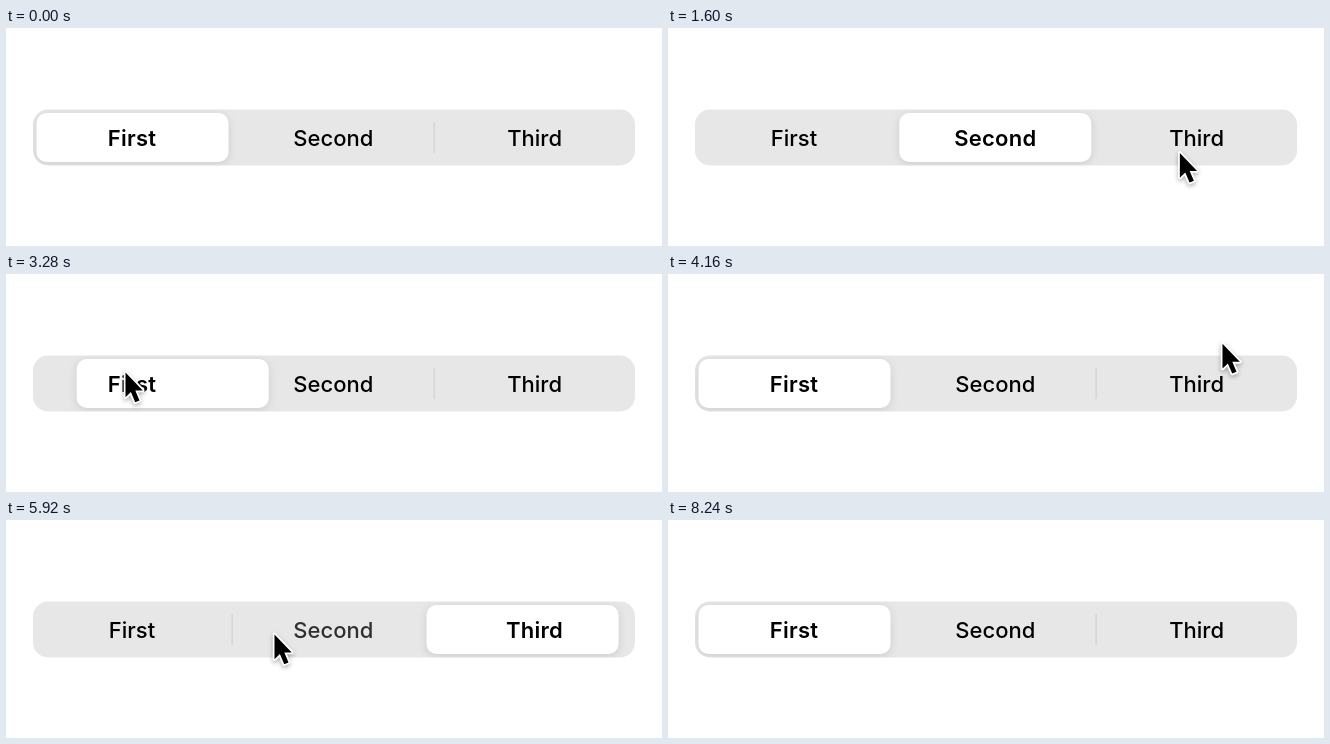
An HTML page for the animation above (9520 ms loop, 656 px wide and 218 px high).

```html
<!DOCTYPE html>
<html lang="en">
<head>
<meta charset="utf-8">
<title>Segmented control</title>
<style>
  html, body { margin: 0; width: 100%; height: 100%; overflow: hidden; background: #fff; }
  svg { display: block; width: 656px; height: 218px; }
  text { font: 500 22px Inter, "Liberation Sans", sans-serif; text-anchor: middle; }
  .bold { font-weight: 600; letter-spacing: .25px; }
  .track { fill: #e7e7e7; }
  .divider { fill: #d2d2d2; }
  #thumb { fill: #fff; filter: drop-shadow(0 2px 4px rgba(0, 0, 0, .11)); }
  #cursor { filter: drop-shadow(0 2px 2px rgba(0, 0, 0, .3)); }
  #cursor path { stroke: #fff; stroke-width: 4; paint-order: stroke; stroke-linejoin: round; }
</style>
</head>
<body>
<svg viewBox="0 0 656 218">
  <clipPath id="inside"><rect x="27" y="81.5" width="602" height="56" rx="15"/></clipPath>
  <rect class="track" x="27" y="81.5" width="602" height="56" rx="15"/>
  <rect class="divider" x="225.5" y="94" width="1.3" height="31"/>
  <rect class="divider" x="427.5" y="94" width="1.3" height="31"/>
  <g clip-path="url(#inside)">
    <rect id="thumb" y="85" width="192" height="49" rx="10"/>
  </g>
  <g id="labels"></g>
  <g id="cursor">
    <path transform="translate(1.5 1.5) scale(.9)" d="M0 0V27.5L6 21.8L10.8 33L15.6 31L10.9 20H19.2Z"/>
  </g>
</svg>
<script>
const LOOP = 9520, STEP = 80, SPRING = 0.024;
const SHOWN = 160, HIDDEN = 8240;
const thumbX = i => 30.5 + 200.8 * i;
const labelX = i => 126 + 201.3 * i;

// The pointer glides to x, y from start until tap, then presses segment seg
const glides = [
  { start: 80, tap: 807, seg: 1, x: 319, y: 115, bow: 0 },
  { start: 1120, tap: 2020, seg: 2, x: 532, y: 100, bow: 22 },
  { start: 2400, tap: 3118, seg: 0, x: 118, y: 97, bow: -34 },
  { start: 3680, tap: 4340, seg: 2, x: 562, y: 94, bow: -34 },
  { start: 4880, tap: 5904, seg: 1, x: 267, y: 113, bow: 0 },
  { start: 6400, tap: 7095, seg: 0, x: 161, y: 113, bow: 0 },
  { start: 8000, tap: HIDDEN, seg: 0, x: 165, y: 164, bow: 0 }
];
const entry = { tap: -LOOP, seg: 0, x: 262, y: 222 };

const thumb = document.getElementById('thumb');
const cursor = document.getElementById('cursor');
const dividers = document.querySelectorAll('.divider');
const labels = document.getElementById('labels');

const texts = ['First', 'Second', 'Third'].map((name, i) =>
  ['', 'bold'].map(cls => {
    const el = document.createElementNS('http://www.w3.org/2000/svg', 'text');
    el.textContent = name;
    el.setAttribute('class', cls);
    el.setAttribute('x', labelX(i));
    el.setAttribute('y', 118);
    return labels.appendChild(el);
  }));

const mix = (a, b, u) => a + (b - a) * u;
const easeOut = u => 1 - (1 - u) ** 3;

// Critically damped spring from 0 to 1
const spring = dt => 1 - (1 + SPRING * dt) * Math.exp(-SPRING * dt);

// Latest glide whose start or tap has passed, with the one before it
function latest(key, t) {
  const n = glides.filter(g => g[key] <= t).length;
  return [glides[n - 2] || entry, glides[n - 1] || entry];
}

function drawControl(t) {
  const [{ seg: from }, { seg: to, tap }] = latest('tap', t);
  const dt = t - tap, p = spring(dt);

  const weight = [0, 0, 0];
  weight[from] += 1 - p;
  weight[to] += p;

  thumb.setAttribute('x', mix(thumbX(from), thumbX(to), p));
  dividers[0].style.opacity = weight[2];
  dividers[1].style.opacity = weight[0];

  // The tapped label dims briefly
  const dim = from === to ? 0 : 0.5 * Math.max(0, 1 - Math.abs(dt - 60) / 75);
  texts.forEach(([plain, bold], i) => {
    const shade = i === to ? 1 - dim : 1;
    const heavy = weight[i] > 0.5;
    plain.style.opacity = heavy ? 0 : shade;
    bold.style.opacity = heavy ? shade : 0;
  });
}

function drawCursor(t) {
  const [a, b] = latest('start', t);
  const u = b === entry ? 1 : Math.min(1, (t - b.start) / (b.tap - b.start));
  const x = mix(a.x, b.x, easeOut(u));
  const y = mix(a.y, b.y, easeOut(u)) + (b.bow || 0) * Math.sin(Math.PI * u);
  cursor.setAttribute('transform', `translate(${x} ${y})`);
  cursor.style.visibility = t >= SHOWN && t < HIDDEN ? 'visible' : 'hidden';
}

const origin = performance.now();
function tick() {
  const elapsed = (performance.now() - origin) % LOOP;
  const t = Math.floor(elapsed / STEP) * STEP;
  drawControl(t);
  drawCursor(t);
  requestAnimationFrame(tick);
}
tick();
</script>
</body>
</html>
```
